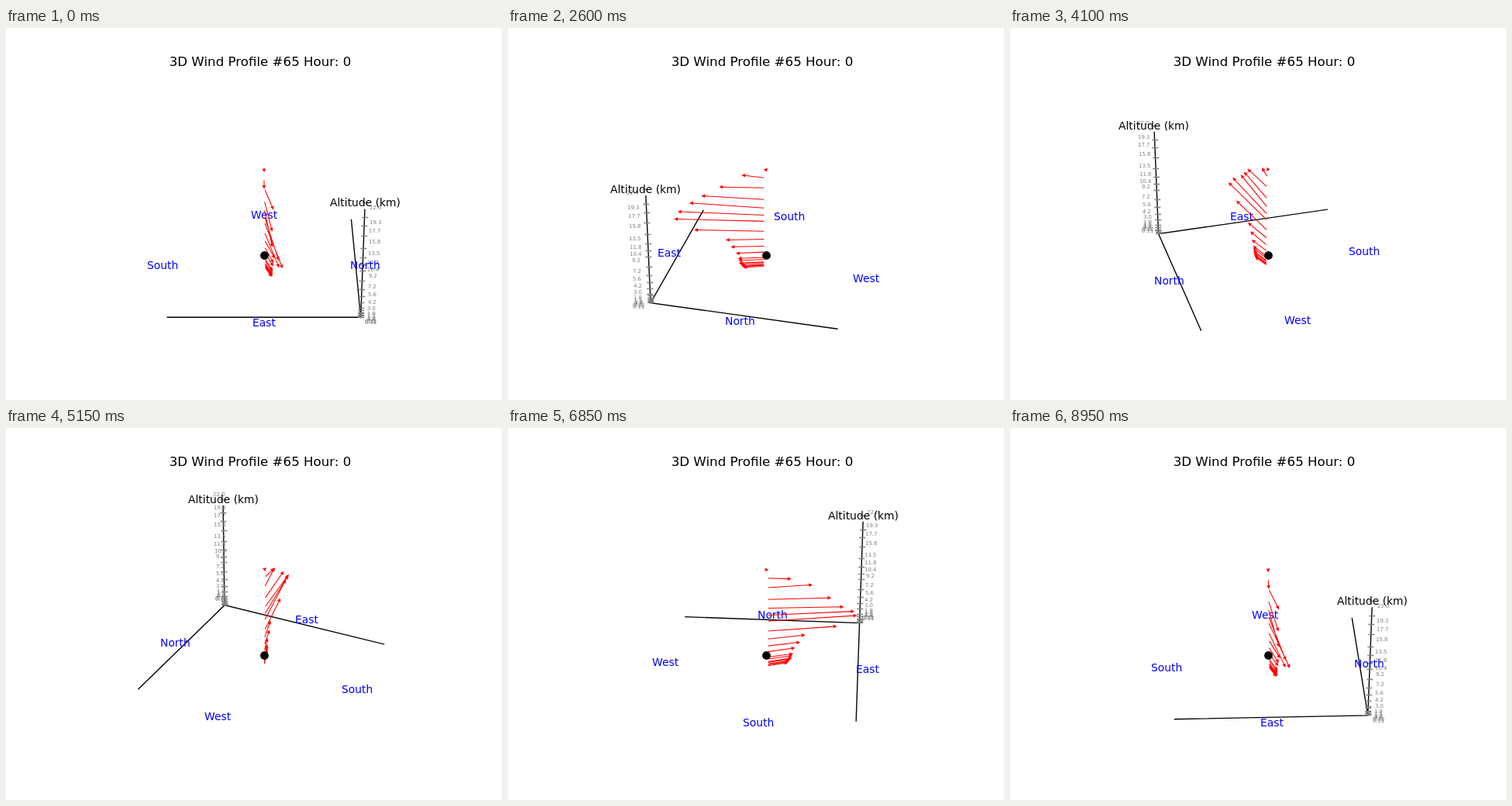
Animation of 640 by 480 pixels, one loop 9 s. Source, as an HTML page:

```html
<!DOCTYPE html>
<html lang="en">
<head>
<meta charset="utf-8">
<title>3D Wind Profile</title>
<style>
html, body { margin: 0; width: 100%; height: 100%; overflow: hidden; background: #fff; }
svg { display: block; width: 100%; height: 100%; font-family: "DejaVu Sans", sans-serif; }
</style>
</head>
<body>
<svg id="stage" viewBox="0 0 640 480"></svg>
<script>
const stage = document.getElementById('stage');
const CX = 333, CY = 237.4, SCALE = 1997.8, DIST = 10;
const SIN_EL = 0.5, COS_EL = Math.sqrt(3) / 2;
const AXIS = 0.6045, TICK_LABEL = 1.1 * AXIS, COMPASS = 0.668;
const FLOOR = 0.11, AXIS_TOP = 20.8;
const STEP = 50, STEPS = 180;
const GAP = 2.78, TIP_GAP = 3.6, HEAD = 4.8, HALF = 2.4;

// altitude in km, then the east and north wind components
const levels = [
  [0.11, 32, 12], [0.32, 33, 12.5], [0.5, 34.5, 13], [0.8, 36, 13],
  [1, 37.5, 13], [1.5, 38, 13], [1.9, 38.7, 13], [3, 41, 14],
  [4.2, 47.8, 14], [5.6, 54, 15.5], [7.2, 95.3, 20], [9.2, 121, 24],
  [10.4, 117.3, 19], [11.8, 103.5, 11], [13.5, 87, 11], [15.8, 62.5, 13],
  [17.7, 36, 0], [19.3, 7, 0], [22]
];

function make(tag, attrs) {
  const el = document.createElementNS('http://www.w3.org/2000/svg', tag);
  for (const key in attrs) el.setAttribute(key, attrs[key]);
  return stage.appendChild(el);
}

function makeText(str, size, fill) {
  const el = make('text', { 'font-size': size, fill });
  el.textContent = str;
  const half = el.getComputedTextLength() / 2;
  return ([x, y]) => {
    el.setAttribute('x', Math.round(x - half));
    el.setAttribute('y', Math.round(y + size * 0.3));
  };
}

const height = km => (km - 11.055) * 0.8572 / 22.8;

function camera(az) {
  const c = Math.cos(az), s = Math.sin(az);
  return (x, y, km) => {
    const z = height(km), depth = c * x + s * y;
    const k = SCALE / (DIST - depth * COS_EL - z * SIN_EL);
    return [CX + (c * y - s * x) * k, CY - (z * COS_EL - depth * SIN_EL) * k];
  };
}

const fix = n => n.toFixed(2);
const pt = p => p.map(fix).join(' ');

const axes = make('path', { fill: 'none', stroke: '#000', 'stroke-width': 1.39, 'stroke-linecap': 'square' });
const ticks = make('path', { fill: 'none', stroke: '#808080', 'stroke-width': 1.5 });
const tickLabels = levels.map(([km]) =>
  makeText(Number.isInteger(km) ? km.toFixed(1) : String(km), 6.944, '#808080'));
const axisLabel = makeText('Altitude (km)', 13.889, '#000');
const compass = [['North', 0, 1], ['South', 0, -1], ['East', 1, 0], ['West', -1, 0]]
  .map(([name, x, y]) => ({ x: x * COMPASS, y: y * COMPASS, place: makeText(name, 13.889, '#00f') }));
const shafts = make('path', { fill: 'none', stroke: '#f00', 'stroke-width': 1.05 });
const heads = make('path', { fill: '#f00' });
make('circle', { cx: 333.5, cy: 293.5, r: 5.4 });
make('text', { x: 328, y: 49, 'font-size': 16.667, 'text-anchor': 'middle' })
  .textContent = '3D Wind Profile #65 Hour: 0';

function arrow([x0, y0], [x1, y1]) {
  let len = Math.hypot(x1 - x0, y1 - y0);
  const ux = (x1 - x0) / len, uy = (y1 - y0) / len;
  const at = (d, side = 0) => pt([x0 + ux * d - uy * side, y0 + uy * d + ux * side]);
  const start = len > GAP ? GAP : 0;
  if (len - start > GAP) len -= TIP_GAP;
  const neck = len - HEAD;
  return {
    shaft: neck > start ? `M${at(start)}L${at(neck + 1)}` : '',
    head: `M${at(len)}L${at(neck, HALF)}L${at(neck, -HALF)}Z`
  };
}

function draw(az) {
  const project = camera(az);
  const corner = pt(project(AXIS, AXIS, FLOOR));
  axes.setAttribute('d',
    `M${pt(project(AXIS, -AXIS, FLOOR))}L${corner}L${pt(project(-AXIS, AXIS, FLOOR))}` +
    `M${corner}L${pt(project(AXIS, AXIS, AXIS_TOP))}`);

  let tickPath = '', shaftPath = '', headPath = '';
  levels.forEach(([km, east, north], i) => {
    const [x, y] = project(AXIS, AXIS, km);
    tickPath += `M${Math.round(x) - 3.7} ${Math.floor(y) + 0.5}h8`;
    tickLabels[i](project(TICK_LABEL, TICK_LABEL, km));
    if (east === undefined) return;
    const k = DIST / SCALE;
    const { shaft, head } = arrow(project(0, 0, km), project(east * k, north * k, km));
    shaftPath += shaft;
    headPath += head;
  });
  ticks.setAttribute('d', tickPath);
  shafts.setAttribute('d', shaftPath);
  heads.setAttribute('d', headPath);

  axisLabel(project(AXIS, AXIS, 22));
  compass.forEach(({ x, y, place }) => place(project(x, y, FLOOR)));
}

const began = performance.now();
function tick() {
  const step = Math.floor((performance.now() - began) / STEP) % STEPS;
  draw(step * 2 * Math.PI / STEPS);
  requestAnimationFrame(tick);
}
tick();
</script>
</body>
</html>
```
